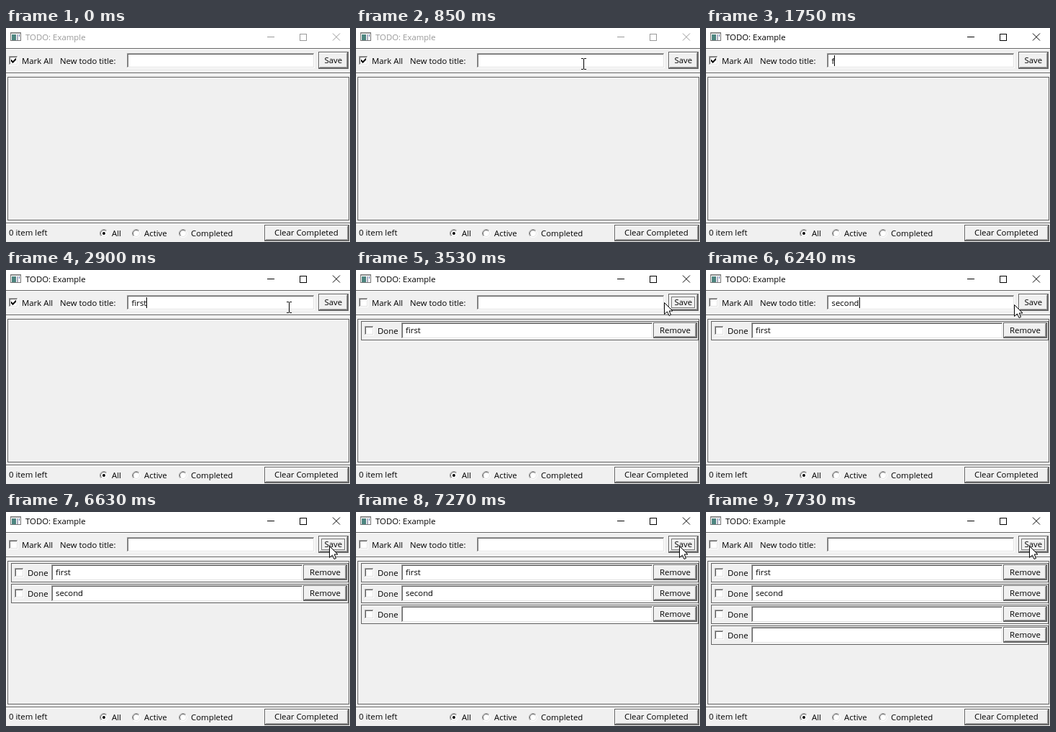
Animation, 478 px wide and 298 px high, one loop 8 s. Source, as an HTML page with a canvas:

```html
<!DOCTYPE html>
<html lang="en">
<head>
<meta charset="utf-8">
<title>TODO: Example</title>
<style>
  html, body { margin: 0; width: 100%; height: 100%; overflow: hidden; background: #f0f0f0; }
  canvas { display: block; }
</style>
</head>
<body>
<canvas id="stage" width="478" height="298"></canvas>
<script>
const ctx = document.getElementById('stage').getContext('2d', { alpha: false });
const LOOP = 8000;
const FACE = '#f0f0f0', DARK = '#646464', MID = '#a0a0a0', LIGHT = '#e3e3e3', WHITE = '#fff', BLACK = '#000';

// [time, x, y] of the pointer; each path stays visible until its end time.
const pointerPaths = [
  { end: 1750, points: [[130, 424, 245], [430, 368, 150], [730, 306, 46], [850, 316, 50], [910, 316, 53], [970, 316, 53], [1030, 316, 50]] },
  { end: 4580, points: [[2900, 393, 52], [3080, 447, 47], [3380, 447, 47], [3500, 428, 45], [3620, 362, 46], [3740, 357, 46]] },
  { end: LOOP, points: [[5970, 357, 46], [6270, 446, 48], [6390, 449, 47]] }
];
const typed = [
  { start: 970, end: 3270, word: 'first', keys: [1750, 1910, 1970, 2030, 2310] },
  { start: 3750, end: 6510, word: 'second', keys: [4580, 4800, 5050, 5200, 5320, 5440] }
];
const presses = [[3150, 3270], [6390, 6510], [7000, 7130], [7520, 7640]];
const rowTexts = ['first', 'second', '', ''];

function rect(x, y, w, h, color) {
  ctx.fillStyle = color;
  ctx.fillRect(x, y, w, h);
}

function frame(x, y, w, h, topLeft, bottomRight = topLeft) {
  rect(x, y, w, 1, topLeft);
  rect(x, y, 1, h, topLeft);
  rect(x, y + h - 1, w, 1, bottomRight);
  rect(x + w - 1, y, 1, h, bottomRight);
}

function text(x, y, string, color = BLACK) {
  ctx.fillStyle = color;
  ctx.fillText(string, x, y);
}

function line(color, ...points) {
  ctx.strokeStyle = color;
  ctx.lineWidth = 1;
  ctx.beginPath();
  points.forEach(([x, y]) => ctx.lineTo(x, y));
  ctx.stroke();
}

function sunken(x, y, w, h) {
  rect(x, y, w, h, WHITE);
  frame(x, y, w, h, MID, WHITE);
  frame(x + 1, y + 1, w - 2, h - 2, DARK, LIGHT);
}

function button(x, y, w, h, label, labelX, baseline, pressed = false) {
  rect(x, y, w, h, FACE);
  frame(x, y, w, h, DARK);
  if (pressed) {
    frame(x + 1, y + 1, w - 2, h - 2, MID);
  } else {
    frame(x + 1, y + 1, w - 2, h - 2, WHITE, '#696969');
    rect(x + 2, y + h - 3, w - 4, 1, MID);
    rect(x + w - 3, y + 2, 1, h - 4, MID);
  }
  text(labelX + pressed, baseline + pressed, label);
}

function checkbox(x, y, checked) {
  sunken(x, y, 13, 13);
  if (!checked) return;
  for (let i = 0; i < 7; i++) rect(x + 3 + i, y + 5 + (i < 3 ? i : 4 - i), 1, 3, BLACK);
}

function radio(x, y, label, selected) {
  const arc = (r, color, from) => {
    ctx.strokeStyle = color;
    ctx.beginPath();
    ctx.arc(x, y, r, from, from + Math.PI);
    ctx.stroke();
  };
  ctx.fillStyle = WHITE;
  ctx.beginPath();
  ctx.arc(x, y, 5.5, 0, 7);
  ctx.fill();
  ctx.lineWidth = 1;
  arc(5.5, MID, Math.PI * .75);
  arc(4.5, DARK, Math.PI * .75);
  arc(5.5, WHITE, -Math.PI * .25);
  arc(4.5, LIGHT, -Math.PI * .25);
  if (selected) {
    ctx.fillStyle = BLACK;
    ctx.beginPath();
    ctx.arc(x, y, 2, 0, 7);
    ctx.fill();
  }
  text(x + 11, 290, label);
}

function titleBar(active) {
  const color = active ? BLACK : '#999';
  rect(0, 0, 478, 28, WHITE);
  rect(6, 6, 15, 12, WHITE);
  frame(6, 6, 15, 12, '#777');
  rect(7, 7, 13, 1, '#aaa');
  rect(8, 9, 6, 8, '#4d8580');
  rect(15, 9, 2, 8, '#a9a9bd');
  rect(18, 9, 1, 3, '#5c78a8');
  text(27, 17, 'TODO: Example', color);
  rect(363, 12, 10, 1, color);
  frame(408, 8, 10, 10, color);
  line(color, [454, 7.5], [464, 17.5]);
  line(color, [464, 7.5], [454, 17.5]);
}

function todoRow(index) {
  const y = 71 + index * 29;
  frame(7, y, 469, 27, DARK);
  checkbox(12, y + 7, false);
  text(30, y + 18, 'Done');
  sunken(63, y + 2, 350, 23);
  text(69, y + 17, rowTexts[index]);
  button(413, y + 2, 61, 22, 'Remove', 422, y + 17);
}

function pointerAt(time) {
  const path = pointerPaths.find(p => time >= p.points[0][0] && time < p.end);
  if (!path) return null;
  const start = path.points[0][0];
  const t = start + Math.floor((time - start) / 60) * 60;
  const next = path.points.findIndex(p => p[0] > t);
  if (next < 0) return path.points.at(-1).slice(1);
  const [t0, x0, y0] = path.points[next - 1], [t1, x1, y1] = path.points[next];
  const k = (t - t0) / (t1 - t0);
  return [Math.round(x0 + (x1 - x0) * k), Math.round(y0 + (y1 - y0) * k)];
}

function drawPointer([x, y]) {
  if (x > 168 && x < 428 && y > 35 && y < 56) {
    rect(x, y - 7, 1, 14, BLACK);
    for (const end of [y - 8, y + 7]) {
      rect(x - 3, end, 3, 1, BLACK);
      rect(x + 1, end, 3, 1, BLACK);
    }
    return;
  }
  ctx.save();
  ctx.translate(x + .5, y + .5);
  const arrow = new Path2D('M0 0V16L4 12.5L6.5 18L9 17L6.7 11.5H11.5Z');
  ctx.fillStyle = WHITE;
  ctx.fill(arrow);
  ctx.strokeStyle = BLACK;
  ctx.lineWidth = 1;
  ctx.stroke(arrow);
  ctx.restore();
}

function draw(time) {
  const rows = presses.filter(p => time >= p[1]).length;
  const pressed = presses.some(([down, up]) => time >= down && time < up);
  const saveFocused = (time >= 3150 && time < 3750) || time >= 6390;
  const entry = typed.find(e => time >= e.start && time < e.end);

  ctx.font = '11.4px "Open Sans", "Noto Sans", sans-serif';
  rect(0, 0, 478, 298, FACE);
  titleBar(time >= 970);
  for (const y of [28, 62, 271]) {
    rect(0, y, 478, 1, DARK);
    rect(0, y + 1, 478, 1, WHITE);
  }

  checkbox(4, 39, rows === 0);
  text(22, 50, 'Mark All');
  text(75, 50, 'New todo title:');
  sunken(168, 35, 261, 21);
  if (entry) {
    const word = entry.word.slice(0, entry.keys.filter(k => time >= k).length);
    text(174.5, 50, word);
    if (!saveFocused) rect(Math.round(174.5 + ctx.measureText(word).width), 38, 1, 15, BLACK);
  }
  button(434, 33, 42, 24, 'Save', 442.5, 49, pressed);
  if (saveFocused) {
    ctx.setLineDash([1, 1]);
    ctx.lineWidth = 1;
    ctx.strokeStyle = BLACK;
    ctx.strokeRect(438.5, 37.5, 32, 15);
    ctx.setLineDash([]);
  }

  frame(2, 68, 475, 200, DARK);
  for (let i = 0; i < rows; i++) todoRow(i);

  text(4, 289, '0 item left');
  radio(136, 286, 'All', true);
  radio(181, 286, 'Active');
  radio(246, 286, 'Completed');
  button(359, 274, 118, 23, 'Clear Completed', 373, 289);

  const pointer = pointerAt(time);
  if (pointer) drawPointer(pointer);
}

const origin = performance.now();
function tick() {
  draw((performance.now() - origin) % LOOP);
  requestAnimationFrame(tick);
}
tick();
</script>
</body>
</html>
```
